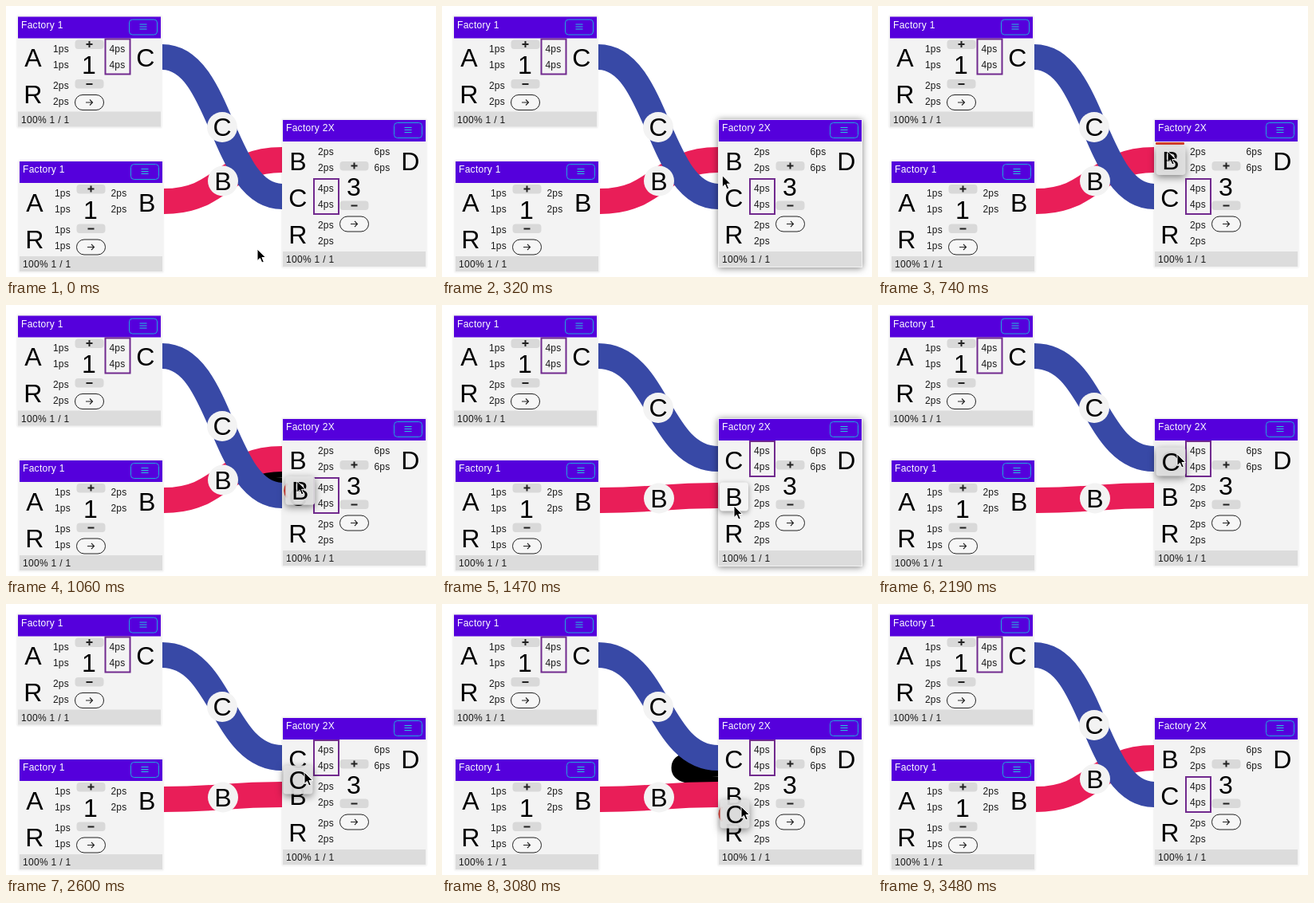
An HTML page for the animation above (3820 ms loop, 539 by 340 pixels).

```html
<!DOCTYPE html>
<html lang="en">
<head>
<meta charset="utf-8">
<title>Factory inputs</title>
<style>
  html, body { margin: 0; width: 100%; height: 100%; overflow: hidden; background: #fff; }
  svg { display: block; width: 539px; height: 340px; }
  text { font-family: "Liberation Sans", Arial, sans-serif; fill: #000; }
  .big { font-size: 32px; text-anchor: middle; }
  .small { font-size: 12px; letter-spacing: .3px; fill: #1a1a1a; }
  .mid { text-anchor: middle; }
  .card { filter: drop-shadow(0 0 1px rgba(0, 0, 0, .12)); }
  .card.hover { filter: drop-shadow(0 1px 4px rgba(0, 0, 0, .5)); }
  .tile { fill: #f4f4f4; filter: drop-shadow(0 2px 3px rgba(0, 0, 0, .4)); }
  .chip rect { fill: #e2e2e2; fill-opacity: .92; filter: drop-shadow(0 3px 5px rgba(0, 0, 0, .5)); }
</style>
</head>
<body>
<svg id="stage" viewBox="0 0 539 340"></svg>
<script>
const LOOP = 3820;
const ROW = 46;
const stage = document.getElementById('stage');

function add(parent, tag, attrs = {}, content = '') {
  const node = document.createElementNS('http://www.w3.org/2000/svg', tag);
  for (const key in attrs) node.setAttribute(key, attrs[key]);
  node.textContent = content;
  parent.append(node);
  return node;
}
const box = (p, x, y, width, height, fill, more) =>
  add(p, 'rect', { x, y, width, height, fill, ...more });
const big = (p, x, y, s) => add(p, 'text', { x, y, class: 'big' }, s);
const small = (p, x, y, s, mid = '') => add(p, 'text', { x, y, class: 'small ' + mid }, s);
const line = (p, d, stroke, width) =>
  add(p, 'path', { d, stroke, 'stroke-width': width, fill: 'none' });
const show = (node, on) => node.setAttribute('visibility', on ? 'visible' : 'hidden');
const move = (node, x, y) => node.setAttribute('transform', `translate(${x} ${y})`);

// A letter with its two rates; side 0 is the input column, side 1 the output column.
function port(card, letter, rate, row, side, marked) {
  const g = add(card, 'g');
  move(g, 0, row * ROW);
  g.tile = box(g, 1, 33.5, 36, 36, '', { rx: 4, class: 'tile', visibility: 'hidden' });
  big(g, side ? 159.7 : 18.8, 62.5, letter);
  const x = side ? 124.5 : 54;
  small(g, x, 44, rate, 'mid');
  small(g, x, 64, rate, 'mid');
  if (marked) box(g, x - 15, 28, 31, 44, 'none', { stroke: '#712a8e', 'stroke-width': 2 });
  return g;
}

function card(x, y, height, title, count, shift) {
  const g = add(stage, 'g', { class: 'card' });
  move(g, x, y);
  box(g, -1, -1, 181, height + 2, '#f3f3f3');
  box(g, 0, 0, 179, 27, '#5500dc');
  box(g, 0, height - 19, 179, 19, '#dcdcdc');
  small(g, 4, 14, title).style.fill = '#fff';
  small(g, 4, height - 5, '100% 1 / 1');
  box(g, 139.5, 3.5, 35, 19, 'none', { rx: 4, stroke: '#20a9dc' });
  line(g, 'M152.5 9.5h9M152.5 12.5h9M152.5 15.5h9', '#25c4dc', 1);

  const mid = add(g, 'g');
  move(mid, -.5, shift);
  for (const top of [29, 78.5]) box(mid, 72, top, 36, 11.5, '#d9d9d9', { rx: 4 });
  line(mid, 'M86 34.5h8M90 30.5v8M86 84.5h8', '#222', 2);
  big(mid, 89.5, 71.5, count);
  box(mid, 72, 98, 36, 19, '#f6f6f6', { rx: 9.5, stroke: '#222' });
  line(mid, 'M85.5 107.5h8.5M90.5 104l3.5 3.5l-3.5 3.5', '#222', 1.1);
  return g;
}

function badge(letter) {
  const g = add(stage, 'g');
  add(g, 'circle', { r: 19, fill: '#f3f3f3' });
  big(g, 0, 11, letter);
  return g;
}

function link(path, mark, x, y, row) {
  const end = 193 + row * ROW, mid = (x + 346) / 2;
  path.setAttribute('d', `M${x} ${y}C${mid} ${y} ${mid} ${end} 346 ${end}`);
  move(mark, mid, (y + end) / 2 + .5);
}

const blob = add(stage, 'path', {
  d: 'M346 200C290 200 290 211 346 211', stroke: '#000', 'stroke-width': 33
});
const red = line(stage, '', '#e91e58', 32);
const blue = line(stage, '', '#3849a6', 32);
const badgeC = badge('C');
const badgeB = badge('B');

const upper = card(15, 13.5, 138, 'Factory 1', '1', 0);
port(upper, 'A', '1ps', 0, 0);
port(upper, 'R', '2ps', 1, 0);
port(upper, 'C', '4ps', 0, 1, true);

const lower = card(17, 195, 138, 'Factory 1', '1', 0);
port(lower, 'A', '1ps', 0, 0);
port(lower, 'R', '1ps', 1, 0);
port(lower, 'B', '2ps', 0, 1);

const maker = card(347, 143, 184, 'Factory 2X', '3', 23);
const portB = port(maker, 'B', '2ps', 0, 0);
const portC = port(maker, 'C', '4ps', 1, 0, true);
const portR = port(maker, 'R', '2ps', 2, 0);
port(maker, 'D', '6ps', 0, 1);

const bar = box(stage, 348, 171, 36, 3, '#d8412c', { rx: 1 });
const chip = add(stage, 'g', { class: 'chip' });
const arc = line(chip, 'M-16 -9Q-22 0 -16 9', '#e5392f', 3);
box(chip, -18.5, -18, 37, 36, '', { rx: 4 });
const chipLetter = big(chip, 0, 11, '');
const pointer = add(stage, 'path', {
  d: 'M0 0V14.5L3.4 11.4L5.8 17L8.3 16L5.9 10.5H10.5Z',
  fill: '#000', stroke: '#fff', 'stroke-width': 1
});

// Moments at which the picture is refreshed: [first, last], 80 ms apart.
const ticks = [[0, 400], [570, 570], [740, 1300], [1470, 2190], [2440, 3480]]
  .flatMap(([a, b]) => Array.from({ length: (b - a) / 80 + 1 }, (_, i) => a + i * 80));

const track = [
  [0, 315, 305], [160, 330, 268], [400, 362, 185], [570, 363, 182], [740, 363, 182],
  [1300, 366, 250], [1470, 366, 252], [1550, 367, 247], [1790, 374, 192],
  [1870, 375, 186], [2190, 375, 187], [2600, 374, 211], [3080, 375, 254],
  [3160, 375, 256], [3400, 335, 304]
];

function pointerAt(t) {
  const i = track.findIndex(k => k[0] > t);
  if (i < 0) return track[track.length - 1].slice(1);
  const [a, b] = [track[i - 1], track[i]];
  const p = (t - a[0]) / (b[0] - a[0]);
  return [a[1] + (b[1] - a[1]) * p, a[2] + (b[2] - a[2]) * p];
}

function draw(time) {
  const t = ticks.filter(k => k <= time).pop();
  const within = (a, b) => t >= a && t < b;
  const [x, y] = pointerAt(t);
  const visible = t < 3480;
  const swapped = within(1470, 3160);
  const dragB = within(570, 1470), dragC = within(2030, 3160);
  const dragging = dragB || dragC;
  const crossing = within(1060, 1470) || within(2760, 3160);

  link(red, badgeB, 198, 245, swapped ? 1 : 0);
  link(blue, badgeC, 196, 64, swapped ? 0 : 1);
  move(portB, 0, swapped ? ROW : 0);
  move(portC, 0, swapped ? 0 : ROW);
  show(blob, crossing);

  const onCard = visible && !dragging && x > 346 && y > 143 && y < 327;
  maker.classList.toggle('hover', onCard);
  const rows = swapped ? [portC, portB, portR] : [portB, portC, portR];
  rows.forEach((p, i) => {
    const top = 176.5 + i * ROW;
    show(p.tile, onCard && x > 348 && x < 384 && y > top && y < top + 36);
  });

  show(bar, dragB && !crossing);
  show(arc, crossing);
  show(chip, dragging);
  chipLetter.textContent = dragB ? 'B' : 'C';
  move(chip, x + (dragB ? 4 : -8), y + (dragB ? 12 : 9.5));
  show(pointer, visible);
  move(pointer, x, y);
}

function frame() {
  draw(performance.now() % LOOP);
  requestAnimationFrame(frame);
}
frame();
</script>
</body>
</html>
```
